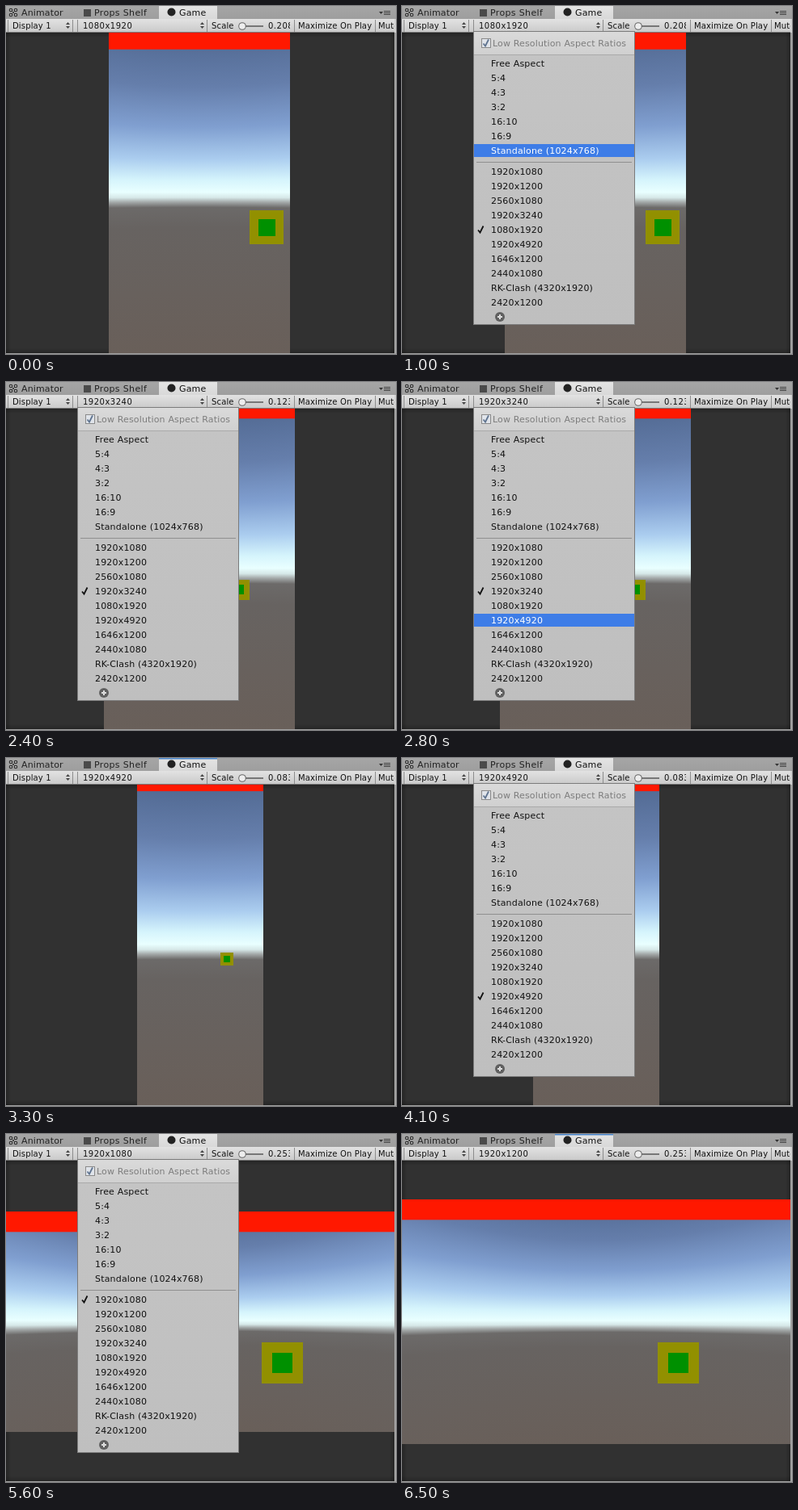
Animation of 482 by 431 pixels, one loop 7.9 s. Source, as an HTML page with a canvas:

```html
<!DOCTYPE html>
<html lang="en">
<head>
<meta charset="utf-8">
<title>Game view</title>
<style>
html, body { margin: 0; width: 100%; height: 100%; overflow: hidden; background: #a2a2a2; }
canvas { display: block; }
</style>
</head>
<body>
<canvas id="stage" width="482" height="431"></canvas>
<script>
const W = 482, H = 431, LOOP = 7900;
const canvas = document.getElementById('stage');
const ctx = canvas.getContext('2d');
const FONT = '"DejaVu Sans", sans-serif';

// width, height, zoom, zoom label, horizontal centre
const modes = {
  '1080x1920': [1080, 1920, 0.2075, '0.208', 239],
  '1920x3240': [1920, 3240, 0.123, '0.123', 239],
  '1920x4920': [1920, 4920, 0.0811, '0.083', 240],
  '1920x1080': [1920, 1080, 0.253, '0.253', 240.5],
  '1920x1200': [1920, 1200, 0.253, '0.253', 240.5]
};

const ratios = ['Free Aspect', '5:4', '4:3', '3:2', '16:10', '16:9', 'Standalone (1024x768)'];
const sizes = ['1920x1080', '1920x1200', '2560x1080', '1920x3240', '1080x1920', '1920x4920',
  '1646x1200', '2440x1080', 'RK-Clash (4320x1920)', '2420x1200'];
const rows = [
  ...ratios.map((label, i) => ({ label, y: 71 + 18 * i })),
  ...sizes.map((label, i) => ({ label, y: 205 + 18 * i }))
];

// time, resolution, menu open, hovered row, tab focused
const steps = [
  [0, '1080x1920', false, '', false],
  [500, '1080x1920', true, '', false],
  [900, '1080x1920', true, '16:10', false],
  [1000, '1080x1920', true, 'Standalone (1024x768)', false],
  [1100, '1080x1920', true, '1920x1200', false],
  [1200, '1080x1920', true, '2560x1080', false],
  [1300, '1080x1920', true, '1920x3240', false],
  [1600, '1920x3240', false, '', true],
  [2400, '1920x3240', true, '', false],
  [2600, '1920x3240', true, '5:4', false],
  [2700, '1920x3240', true, '1920x1200', false],
  [2800, '1920x3240', true, '1920x4920', false],
  [3200, '1920x3240', false, '', true],
  [3300, '1920x4920', false, '', true],
  [4100, '1920x4920', true, '', false],
  [4200, '1920x4920', true, '4:3', false],
  [4300, '1920x4920', true, '16:9', false],
  [4400, '1920x4920', true, '1920x1200', false],
  [4600, '1920x4920', true, '1920x1080', false],
  [4700, '1920x4920', false, '', true],
  [4800, '1920x1080', false, '', true],
  [5600, '1920x1080', true, '', false],
  [5800, '1920x1080', true, '4:3', false],
  [5900, '1920x1080', true, 'Standalone (1024x768)', false],
  [6000, '1920x1080', true, '2560x1080', false],
  [6100, '1920x1080', true, '1920x1200', false],
  [6400, '1920x1080', false, '', true],
  [6500, '1920x1200', false, '', true]
];

// slope below the eye line -> colour
const sky = [
  [-0.56, '#526a93'], [-0.383, '#657eab'], [-0.238, '#809fd0'], [-0.122, '#abcdef'],
  [-0.049, '#d5f4fc'], [-0.005, '#e9ffff'], [0.014, '#d6e8e8'], [0.03, '#a3a8a8'],
  [0.049, '#6c6a69'], [0.12, '#676361'], [0.58, '#695f59']
];

function rect(x, y, w, h, fill, c = ctx) {
  c.fillStyle = fill;
  c.fillRect(x, y, w, h);
}

function fade(x0, y0, x1, y1, ...colors) {
  const g = ctx.createLinearGradient(x0, y0, x1, y1);
  colors.forEach((c, i) => g.addColorStop(i / (colors.length - 1), c));
  return g;
}

function text(str, x, y, size, color = '#111', spacing = 0.15) {
  ctx.font = size + 'px ' + FONT;
  ctx.letterSpacing = spacing + 'px';
  ctx.fillStyle = color;
  ctx.fillText(str, x, y);
}

function shape(points, fill) {
  ctx.beginPath();
  points.forEach(([x, y]) => ctx.lineTo(x, y));
  ctx.fillStyle = fill;
  ctx.fill();
}

function disc(x, y, r, fill) {
  ctx.beginPath();
  ctx.arc(x, y, r, 0, 7);
  ctx.fillStyle = fill;
  ctx.fill();
}

function tick(x, y, color) {
  ctx.beginPath();
  ctx.moveTo(x, y);
  ctx.lineTo(x + 2.5, y + 3);
  ctx.lineTo(x + 6.5, y - 5);
  ctx.strokeStyle = color;
  ctx.lineWidth = 1.8;
  ctx.stroke();
}

function clipped(x, y, w, h, draw) {
  ctx.save();
  ctx.beginPath();
  ctx.rect(x, y, w, h);
  ctx.clip();
  draw();
  ctx.restore();
}

// The horizon bends because slope shrinks towards the sides of a wide view.
const views = {};
function gameView(name) {
  if (views[name]) return views[name];
  const c = document.createElement('canvas');
  c.width = 480;
  c.height = H;
  const g = c.getContext('2d');
  const [w, h, zoom, , cx] = modes[name];
  const cy = 232.4, vw = w * zoom, vh = h * zoom;
  const left = Math.max(0, Math.round(cx - vw / 2));
  const right = Math.min(480, Math.round(cx + vw / 2));
  const top = Math.max(33, Math.round(cy - vh / 2));
  const bottom = Math.min(430, Math.round(cy + vh / 2));
  const focal = vh / 2 / Math.tan(Math.PI / 6);
  const first = sky[0][0], span = sky[sky.length - 1][0] - first;
  for (let x = left; x < right; x++) {
    const k = Math.hypot(focal, x + 0.5 - cx);
    const grad = g.createLinearGradient(0, cy + first * k, 0, cy + (first + span) * k);
    for (const [s, color] of sky) grad.addColorStop((s - first) / span, color);
    rect(x, top, 1, bottom - top, grad, g);
  }
  rect(left, top, right - left, 100 * zoom, '#ff1800', g);
  const square = (size, color) => {
    const d = Math.round(size * zoom);
    rect(Math.round(cx + 401 * zoom - d / 2), Math.round(cy + 201 * zoom - d / 2), d, d, color, g);
  };
  square(200, '#929000');
  square(100, '#009000');
  return views[name] = c;
}

function drawBackdrop() {
  rect(0, 0, W, H, '#a2a2a2');
  rect(0, 33, 480, 397, '#313131');
  const dark = 'rgba(0,0,0,.25)', none = 'rgba(0,0,0,0)';
  rect(0, 33, 480, 6, fade(0, 33, 0, 39, dark, none));
  rect(0, 424, 480, 6, fade(0, 430, 0, 424, dark, none));
  rect(0, 33, 6, 397, fade(0, 0, 6, 0, dark, none));
  rect(474, 33, 6, 397, fade(480, 0, 474, 0, dark, none));
}

function drawTabs(focused) {
  rect(0, 0, 482, 16, fade(0, 0, 0, 16, '#a6a6a6', '#9e9e9e'));
  rect(189, 0, 72, 16, fade(0, 0, 0, 16, '#e4e4e4', '#d8d8d8'));
  if (focused) rect(189, 0, 72, 1.5, '#4d88cc');
  const nodes = [[6, 5], [12, 5], [6, 11], [12, 11]];
  ctx.strokeStyle = '#444';
  ctx.lineWidth = 1;
  ctx.beginPath();
  ctx.moveTo(6, 5);
  ctx.lineTo(12, 11);
  ctx.moveTo(12, 5);
  ctx.lineTo(6, 11);
  ctx.stroke();
  for (const [x, y] of nodes) {
    disc(x, y, 2.3, '#333');
    disc(x, y, 0.9, '#ddd');
  }
  rect(96, 4, 9, 9, '#4a4a4a');
  disc(204.5, 7.5, 5, '#222');
  text('Animator', 19, 12, 11, '#222');
  text('Props Shelf', 109, 12, 11, '#222', 0.35);
  text('Game', 214, 12, 11);
  shape([[461, 7], [466, 7], [463.5, 10]], '#333');
  for (const y of [6, 8, 10]) rect(467, y, 8, 1, '#444');
}

function arrows(x) {
  shape([[x - 2.5, 23], [x + 2.5, 23], [x, 20]], '#444');
  shape([[x - 2.5, 25], [x + 2.5, 25], [x, 28]], '#444');
}

function drawToolbar(mode) {
  rect(0, 16, 480, 17, fade(0, 16, 0, 32, '#e2e2e2', '#cacaca'));
  rect(0, 32, 480, 1, '#777');
  rect(480, 16, 2, 17, '#d2d2d2');
  for (const x of [2, 82, 88, 248, 356, 456]) rect(x, 17, 1, 15, '#8c8c8c');
  text('Display 1', 8, 28, 10);
  arrows(76.5);
  text(mode, 95, 28, 10, '#111', 0.5);
  arrows(242.5);
  text('Scale', 254, 28, 10);
  rect(296, 24, 22, 2, '#777');
  disc(292, 25, 4.8, '#666');
  disc(292, 25, 3.8, '#eee');
  clipped(320, 17, 31, 15, () => text(modes[mode][3], 324, 28, 10, '#111', 0.5));
  text('Maximize On Play', 361, 28, 10);
  clipped(457, 17, 23, 15, () => text('Mute Audio', 460, 28, 10));
}

function drawMenu(mode, hover) {
  rect(88, 31, 200, 364, '#7b7b7b');
  rect(89, 32, 198, 362, fade(0, 60, 0, 394, '#c4c4c4', '#bfbfbf'));
  rect(89, 32, 198, 28, fade(0, 32, 0, 60, '#dadada', '#d0d0d0'));
  rect(89, 60, 198, 1, '#aaa');
  rect(98, 40, 12, 12, '#8a8a8a');
  rect(99, 41, 10, 10, '#e0e4ea');
  tick(100.5, 46.5, '#607490');
  text('Low Resolution Aspect Ratios', 112, 50, 11, '#7c7c7c');
  rect(92, 193, 192, 1, '#8f8f8f');
  for (const { label, y } of rows) {
    const lit = label === hover;
    if (lit) rect(89, y - 8, 198, 16, '#3e7de7');
    text(label, 110, y + 4, 11, lit ? '#fff' : '#111', 0.18);
    if (label === mode) tick(94, y + 0.5, lit ? '#fff' : '#111');
  }
  disc(121, 385, 6, '#606060');
  rect(118, 384, 6, 2, '#ddd');
  rect(120, 382, 2, 6, '#ddd');
}

function draw(t) {
  const [, mode, open, hover, focused] = steps.findLast(s => s[0] <= t);
  drawBackdrop();
  ctx.drawImage(gameView(mode), 0, 0);
  drawTabs(focused);
  drawToolbar(mode);
  if (open) drawMenu(mode, hover);
}

const start = performance.now();
function tickFrame() {
  draw((performance.now() - start) % LOOP);
  requestAnimationFrame(tickFrame);
}
tickFrame();
</script>
</body>
</html>
```
